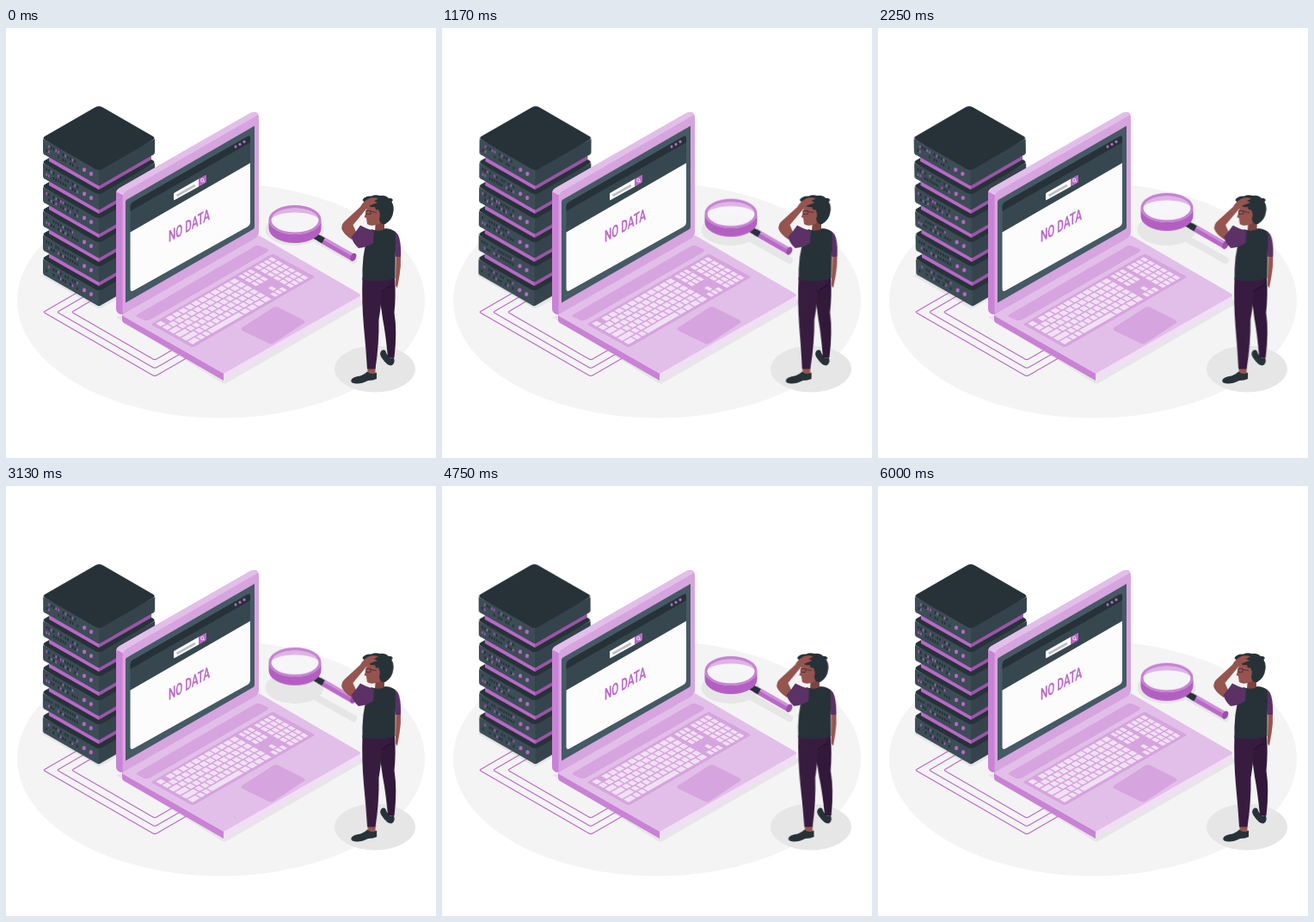
Write an HTML page that moves like this. It is 500 px wide and 500 px high and loops after 6.04 s.

```html
<!DOCTYPE html>
<html lang="en">
<head>
<meta charset="utf-8">
<title>No data</title>
<style>
  html, body { margin: 0; width: 100%; height: 100%; overflow: hidden; background: #fff; }
  svg { display: block; width: 100vw; height: 100vh; }
  .headline { font: 500 18.5px Roboto, "Open Sans", sans-serif; fill: #ba68c8; stroke: #ba68c8; stroke-width: .3; }
</style>
</head>
<body>
<svg viewBox="0 0 500 500">
  <ellipse cx="250" cy="317" rx="237" ry="136.5" fill="#f4f4f4"/>

  <!-- ground shadows -->
  <g fill="#e6e6e6">
    <path d="M41 288L105 325Q108 327 112 325L150 303L108 270Z"/>
    <path d="M128 336L250 412Q254 415 258 412L414 322Q417 319 413 316L294 300Z"/>
    <ellipse cx="335.500" cy="234.500" rx="34" ry="18.500"/>
    <path d="M361 246L404 270" stroke="#e6e6e6" stroke-width="8" stroke-linecap="round"/>
    <ellipse cx="429" cy="396.500" rx="47" ry="27"/>
  </g>

  <!-- cables -->
  <g fill="none" stroke="#ba68c8" stroke-width="1.1" stroke-linejoin="round">
    <path d="M90 303.500L45 329.500Q43.500 330.300 45 331.200L171 403.900Q173 405 175 403.900L214 381.400"/>
    <path d="M98 308L61 329.500Q59.500 330.300 61 331.200L171 394.700Q173 395.800 175 394.700L212 373.400"/>
    <path d="M106 313L78 329.500Q76.500 330.300 78 331.200L171 384.900Q173 386 175 384.900L206 367"/>
  </g>

  <g id="servers"></g>

  <!-- laptop base -->
  <path d="M135 333V339Q135 342 138 343.500L253 410V401Z" fill="#c982d5"/>
  <path d="M253 401V410L410 320Q412 318 412 316V310Z" fill="#f0dff4"/>
  <path d="M135 333L294 241L411 309Q413 311 411 312L253 402L136 335Z" fill="#e2bfe9"/>
  <path d="M153 333L289 254Q292 252 295 253L304 257Q306 259 303 261L168 339Q164 341 161 340L153 336Q150 335 153 333Z" fill="#d6a4de"/>
  <path d="M171 343L307 264Q310 262 313 264L357 288Q360 290 357 291L220 370Q217 372 214 370L171 346Q168 345 171 343Z" fill="#d6a4de"/>
  <g id="keys" fill="#f1e1f4" transform="matrix(1.41 -.81 .48 .27 169 344)"></g>
  <path d="M275 348L310 325.500Q313 323.500 316 324.500L346 339.500Q349 341.500 346 343.500L312 366Q309 368 306 367L275 352Q272 350 275 348Z" fill="#d6a4de"/>

  <!-- laptop lid -->
  <path d="M128 193Q128 188 132 186L284 99Q294 95 294 105V237Q294 242 290 244.500L141 330L136 333Q128 333 128 325Z" fill="#d6a4de"/>
  <path d="M128 191Q129 187.500 132 186L284 99Q290 96.500 293 101L140 189.500Q137 191.500 136 195Z" fill="#e2bfe9"/>
  <path d="M128 193Q128 192 128.500 190.500L136 194.500Q135.500 196 135.500 198V331.500Q136 333 135 333Q128 333 128 325Z" fill="#c982d5"/>
  <path d="M139 202Q139 200.500 140.500 199.500L289 113.700V231Q289 233 287.500 234L139 319.500Z" fill="#455a64"/>
  <path d="M144.500 208Q144.500 204 148 202L281 126Q284 124.500 284 128V226Q284 229 281 231L148 306Q144.500 307 144.500 303Z" fill="#37474f"/>
  <path d="M144.500 213V208Q144.500 204 148 202L281 126Q284 124.500 284 128V133Z" fill="#263238"/>
  <path d="M144.500 237.500L284 157V226Q284 229 281 231L148 305.500Q144.500 307 144.500 303Z" fill="#fcfcfc"/>
  <g fill="#ba68c8">
    <ellipse cx="267" cy="138" rx="1.500" ry="1.800"/>
    <ellipse cx="272" cy="135.200" rx="1.500" ry="1.800"/>
    <ellipse cx="277" cy="132.300" rx="1.500" ry="1.800"/>
    <path d="M224 175.500L232 171Q233 170.500 233 172V178Q233 179 232 180L224 184.500Z"/>
  </g>
  <path d="M195 193Q195 192 196 191.500L224 175.500V184.500L196 200Q195 200.500 195 199Z" fill="#fff"/>
  <path d="M198.500 195L220 182.800" stroke="#b9bfc2" stroke-width="2.600"/>
  <g fill="none" stroke="#fff" stroke-width=".8">
    <ellipse cx="228.300" cy="177" rx="1.700" ry="2"/>
    <path d="M229.500 178.500L231 179"/>
  </g>
  <text class="headline" transform="matrix(.632 -.355 0 1 189 249.300)">NO DATA</text>

  <!-- magnifier -->
  <g id="lens">
    <path d="M364 244.200L404 267.200" stroke="#ba68c8" stroke-width="8"/>
    <path d="M366 242.700L405 265" stroke="#cf93da" stroke-width="3"/>
    <ellipse cx="403.800" cy="266.500" rx="3.200" ry="4.800" transform="rotate(24 403.800 266.500)" fill="#9a4fa9"/>
    <path d="M358 241L369 247.300" stroke="#263238" stroke-width="7"/>
    <ellipse cx="336" cy="223.500" rx="27.500" ry="14" fill="#f7f5f8" fill-opacity=".9"/>
    <path d="M308.500 223.500A27.500 14 0 0 1 363.500 223.500A27.500 9 0 0 0 308.500 223.500Z" fill="#dfb3e6"/>
    <path d="M305.500 223V233A30.500 17 0 0 0 366.500 233V223A30.500 17 0 0 1 305.500 223Z" fill="#b35fc2"/>
    <path fill-rule="evenodd" fill="#c682d2" d="M305.500 223A30.500 17 0 0 1 366.500 223A30.500 17 0 0 1 305.500 223ZM308.500 223.500A27.500 14 0 0 0 363.500 223.500A27.500 14 0 0 0 308.500 223.500Z"/>
  </g>

  <!-- person -->
  <g id="person">
    <path d="M443.500 380H451L450.500 388L444 385Z" fill="#96544f"/>
    <path d="M435.500 377Q437 373 441 375Q443 381 447 384L451 383Q453 391 448 392.500Q443 392.500 438 385Q434 380 435.500 377Z" fill="#263238"/>
    <path d="M432 290H452Q453.500 312 451.500 331Q455 353 451.500 383H444Q441.500 356 438 338L434 310Z" fill="#32183a"/>
    <path d="M420.500 394H429.500V404H420.500Z" fill="#96544f"/>
    <path d="M401.500 409Q403 405.500 412 404.500Q418 402 420 399.500Q425 404 431 400.500V408Q427 410 421 410Q413 414 407 413.500Q400 413 401.500 409Z" fill="#263238"/>
    <path d="M414.500 290H450Q446 302 437 307Q436 325 433.500 339Q434 367 429.500 396.500H420Q418.500 372 416 347Q413.500 319 414.500 290Z" fill="#381c40"/>
    <path d="M449 300Q442 301 436.500 307" fill="none" stroke="#26122c" stroke-width="1"/>
    <path d="M453.500 264H459Q459.500 277 457.500 288L455 302Q452 301 453 291Z" fill="#96544f"/>
    <path d="M449 235Q457 237 458.500 250Q459.500 260 459 266H453Z" fill="#5b3166"/>
    <path d="M430 224H440V237Q434 241 429 236Z" fill="#7d4341"/>
    <path d="M420 208Q418.500 213 418 216L416.500 220L419 221L420 228Q424 231 430 229Q437 228 438 220L436 207Z" fill="#96544f"/>
    <path d="M414.500 200Q417 195 425 195.500Q429 193.500 435 195Q441 194 445 198Q448 197 450 200L448.500 202Q451.500 207 450.500 213Q449.500 223 441 228Q435 229 434 222Q436 217 433 211Q430 213 429 208Q423 209 419.500 206Q417 203 414.500 200Z" fill="#263238"/>
    <ellipse cx="432" cy="216.500" rx="2.300" ry="3.600" fill="#96544f"/>
    <path d="M418.500 212.500H424V216.500H419ZM424 213.500L431 214.500" fill="none" stroke="#3a2530" stroke-width=".7"/>
    <path d="M425 234Q435 238 441 233Q451 233.500 453 239L452.500 291Q437 296 414.500 293Q414 280 415.500 266L420 240Z" fill="#263238"/>
    <path d="M390.500 234Q389.500 229 393 225.500L412 208Q416 200.500 424 197.500Q430 196.500 433 198.500L428 201L432 203L423 206.500L418.500 211L403.500 229L407 237L402 246Q393 240 390.500 234Z" fill="#96544f"/>
    <path d="M412 229.500Q420 234 428 236L427 250Q420 255 410 256Q404 251 401.500 243Q407 237 412 229.500Z" fill="#5b3166"/>
  </g>
</svg>
<script>
const PERIOD = 6040;
const byId = id => document.getElementById(id);
const path = (d, fill) => `<path d="${d}" fill="${fill}"/>`;

let seed = 11;
const random = () => (seed = seed * 16807 % 2147483647) / 2147483647;

// One rack unit; y is the height of its left corner.
function unit(y) {
  let s = path(`M43 ${y + 1}V${y + 16}Q43 ${y + 19} 46 ${y + 20}L105 ${y + 54}Q108 ${y + 56} 108 ${y + 55}V${y + 35}Z`, "#3c4d56")
    + path(`M173 ${y + 1}V${y + 16}Q173 ${y + 19} 170 ${y + 20}L111 ${y + 54}Q108 ${y + 56} 108 ${y + 55}V${y + 35}Z`, "#35444c")
    + path(`M45 ${y - 2}L104 ${y - 36}Q108 ${y - 38} 112 ${y - 36}L171 ${y - 2}Q174 ${y} 171 ${y + 2}L112 ${y + 36}Q108 ${y + 38} 104 ${y + 36}L45 ${y + 2}Q42 ${y} 45 ${y - 2}Z`, "#263238");
  for (let row = 0; row < 2; row++) {
    for (let i = 0; i < 14; i++) {
      if (random() < .2) continue;
      const x = 46.5 + i * 2.75;
      const top = y + (x - 43) * .57 + 4.8 + row * 6;
      const fill = random() < .36 ? "#a960b7" : "#222d33";
      s += `<rect x="${x}" y="${top.toFixed(1)}" width="1.4" height="3.2" fill="${fill}"/>`;
    }
  }
  for (const x of [91, 99]) {
    s += `<ellipse cx="${x}" cy="${y + 9.5 + (x - 43) * .57}" rx="2.1" ry="2.5" fill="#ba68c8"/>`;
  }
  return s;
}

// Inset slab between two units.
const slab = y =>
  path(`M50 ${y + 18}V${y + 27}L108 ${y + 60}V${y + 50}Z`, "#ba68c8") +
  path(`M169 ${y + 18}V${y + 25}L108 ${y + 60}V${y + 50}Z`, "#9a55a8");

let rack = "";
for (let i = 5; i >= 0; i--) {
  const y = 128 + i * 28;
  if (i < 5) rack += slab(y);
  rack += unit(y);
}
byId("servers").innerHTML = rack;

// Keyboard laid out on a 100 x 100 plane.
let keys = "";
const key = (x, row, w) => {
  keys += `<rect x="${x}" y="${5 + row * 15.4}" width="${w}" height="12.2" rx=".5"/>`;
};
const run = (x, end, row, count) => {
  const step = (end - x) / count;
  for (let i = 0; i < count; i++) key(x + i * step, row, step - 1);
};
const firstKey = [4, 4, 6.5, 8, 10, 6];
firstKey.forEach((w, row) => {
  key(2, row, w);
  const x = 3 + w + (row ? 0 : 3);
  if (row === 5) {
    run(x, 18, row, 2);
    key(18, row, 26);
    run(45, 68, row, 4);
  } else {
    run(x, 68, row, row ? 12 : 11);
  }
  if (row < 3 || row === 5) run(70, 81, row, 3);
  if (row === 4) key(73.7, row, 2.7);
  run(83, 98.5, row, 4);
});
byId("keys").innerHTML = keys;

function loop(id, frames, duration, origin) {
  const el = byId(id);
  if (origin) el.style.transformOrigin = origin;
  el.animate(frames.map(([offset, transform]) => ({ offset, transform })),
    { duration, iterations: Infinity }).startTime = 0;
}

const sway = [[0, "skewX(0deg)"], [.25, "skewX(-1deg)"], [.75, "skewX(1deg)"], [1, "skewX(0deg)"]];
loop("servers", sway, PERIOD / 2, "108px 207px");
loop("person", sway, PERIOD, "430px 304px");
loop("lens", [[0, "translateY(0px)"], [.5, "translateY(-19px)"], [1, "translateY(0px)"]], PERIOD);
</script>
</body>
</html>
```
